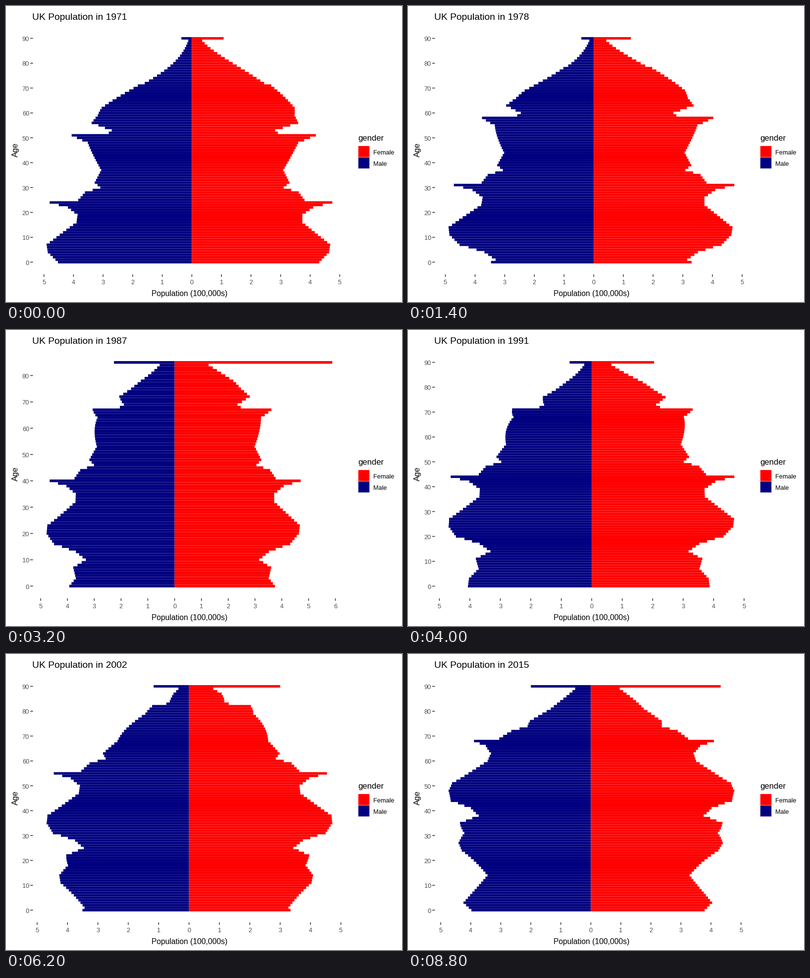
A matplotlib script that plays this animation: 800x600 px, repeating every 9 s.

```python
import numpy as np
import matplotlib.pyplot as plt
from matplotlib.animation import FuncAnimation
from matplotlib.collections import LineCollection, PolyCollection

W, H, DPI = 800, 600, 100
FIRST, LAST = 1971, 2015
RED, NAVY, TICK, GREY = "#ff0000", "#000080", "#333333", "#4d4d4d"

# Bars span LEFT..RIGHT, the panel adds five percent on every side.
LEFT, RIGHT = 82.0, 659.2
PAD = (RIGHT - LEFT) * 0.05
MID_Y, PANEL_H = 292.4, 504.6

# Booms and slumps in births: year, girls (hundred thousands).
BIRTHS = [
    (1882, 2.53), (1893, 3.13), (1899, 3.44), (1900, 3.66), (1909, 3.93),
    (1912, 3.80), (1915, 3.84), (1916, 3.53), (1918, 2.96), (1919, 3.04),
    (1920, 4.36), (1921, 4.14), (1923, 3.70), (1934, 3.12), (1939, 3.32),
    (1941, 3.12), (1943, 3.63), (1946, 3.82), (1947, 4.76), (1949, 4.11),
    (1952, 3.74), (1955, 3.74), (1957, 3.95), (1964, 4.68), (1967, 4.64),
    (1971, 4.31), (1972, 4.02), (1974, 3.51), (1977, 3.15), (1980, 3.59),
    (1984, 3.50), (1988, 3.81), (1991, 3.85), (1996, 3.55), (2001, 3.26),
    (2010, 3.90), (2012, 4.04), (2015, 3.79)]


def logistic(x):
    return 1 / (1 + np.exp(-x))


def progress(year):
    """Gain in life expectancy, from 0 in the first year to 1 in the last."""
    return ((year - FIRST) / (LAST - FIRST)) ** 1.4


def survival(year, age):
    hazard = 0.636 * np.exp(0.103 * (age - 78))
    return np.exp(-hazard * (1 - 0.34 * progress(year)))


def migration(year, born):
    wave = np.exp(-0.5 * ((born - 1981) / 8) ** 2)
    return 1 + 0.24 * wave * logistic((year - 2003) / 4)


def men_per_woman(year, age):
    turn = 76 + 13 * progress(year)
    loss = 0.055 * logistic((age - 22) / 3) + 1.2 * logistic((age - turn) / 6.5)
    return 1.05 * np.exp(-loss)


def population(year):
    """Men and women by age; the last entry is the open group."""
    top = 85 if 1981 <= year <= 1990 else 90
    age = np.arange(103)
    born = year - age
    women = (np.interp(born, *zip(*BIRTHS)) * survival(year, age)
             * migration(year, born))
    men = women * men_per_woman(year, age)
    return [np.append(p[:top], p[top:].sum()) for p in (men, women)]


def bars(x0, ends, ys, step):
    h = step / 2
    return [[(x0, y - h), (x, y - h), (x, y + h), (x0, y + h)]
            for x, y in zip(ends, ys)]


plt.rcParams["font.family"] = "Liberation Sans"
fig = plt.figure(figsize=(W / DPI, H / DPI), dpi=DPI, facecolor="white")
ax = fig.add_axes([0, 0, 1, 1])
ax.set_xlim(0, W)
ax.set_ylim(H, 0)
ax.axis("off")


def label(x, y, text, px, **kw):
    return ax.text(x, y, text, fontsize=px * 72 / DPI, **kw)


title = label(53, 28, "", 19.3)
label(370.5, 588, "Population (100,000s)", 15.6, ha="center")
label(19.5, 292, "Age", 16.4, ha="center", va="center", rotation=90)
label(711, 273.5, "gender", 16.6)
for y, name, color in ((283.8, "Female", RED), (306.9, "Male", NAVY)):
    ax.add_patch(plt.Rectangle((711.8, y), 22.4, 22.4, fc=color, lw=0, snap=False))
    label(742, y + 17.5, name, 12.7)

men_bars = PolyCollection([], facecolors=NAVY, linewidths=0, snap=False)
women_bars = PolyCollection([], facecolors=RED, linewidths=0, snap=False)
ticks = LineCollection([], colors=TICK, linewidths=1.5 * 72 / DPI, snap=False)
for part in (men_bars, women_bars, ticks):
    ax.add_collection(part, autolim=False)

x_labels = [label(0, 564.3, "", 12.7, color=GREY, ha="center")
            for _ in range(15)]
y_labels = [label(47, 0, "", 12.7, color=GREY, ha="right")
            for _ in range(10)]


def draw(i):
    year = FIRST + i
    men, women = population(year)
    scale = (RIGHT - LEFT) / (men.max() + women.max())
    x0 = LEFT + men.max() * scale
    top = len(men) - 1
    step = PANEL_H / ((top + 1) * 1.1)
    ys = MID_Y - (np.arange(top + 1) - top / 2) * step

    title.set_text(f"UK Population in {year}")
    men_bars.set_verts(bars(x0, x0 - men * scale, ys, step))
    women_bars.set_verts(bars(x0, x0 + women * scale, ys, step))

    marks = []
    for k, text in enumerate(x_labels, -7):
        x = x0 + k * scale
        shown = LEFT - PAD <= x <= RIGHT + PAD
        text.set_visible(shown)
        if shown:
            text.set_text(str(abs(k)))
            text.set_x(x)
            marks.append([(x, 544), (x, 549)])
    for k, text in enumerate(y_labels):
        shown = k * 10 <= top
        text.set_visible(shown)
        if shown:
            y = ys[k * 10]
            text.set_text(str(k * 10))
            text.set_y(y + 5.5)
            marks.append([(49, y), (54.5, y)])
    ticks.set_segments(marks)
    return []


anim = FuncAnimation(fig, draw, frames=LAST - FIRST + 1, interval=200,
                     init_func=lambda: draw(0), repeat=True, repeat_delay=0)
plt.show()
```
